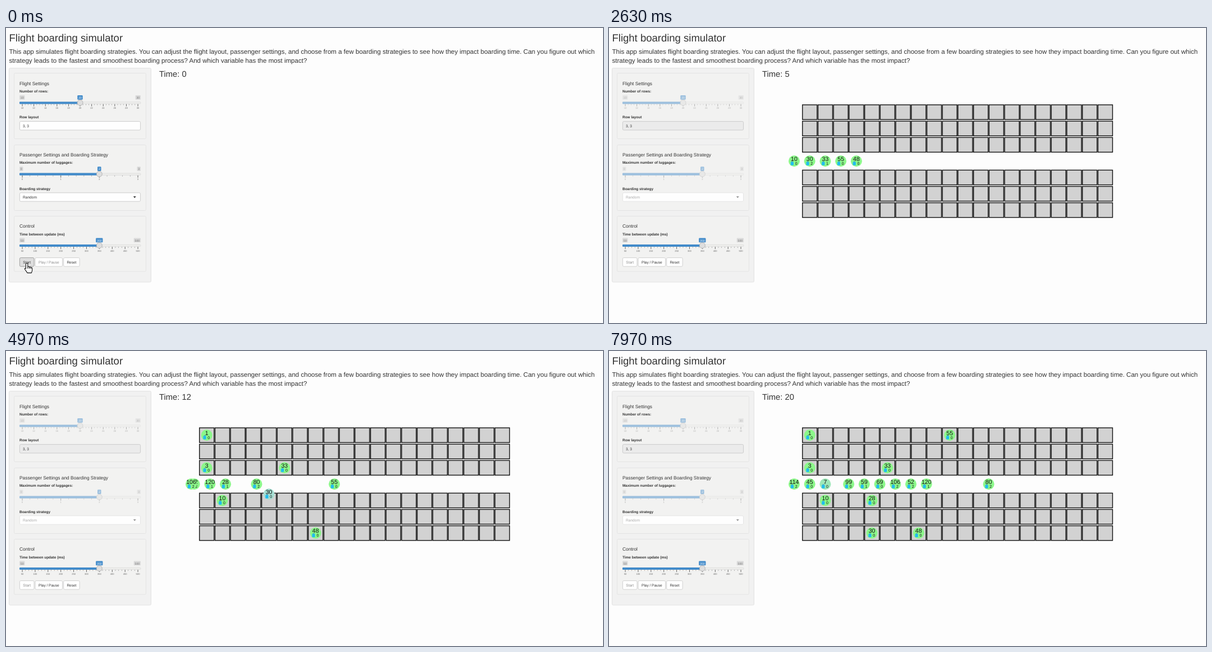
An HTML page that plays this animation: 1064x526 px, repeating every 8000 ms.

```html
<!DOCTYPE html>
<html lang="en">
<head>
<meta charset="utf-8">
<title>Flight boarding simulator</title>
<style>
html, body { margin: 0; width: 100%; height: 100%; overflow: hidden; background: #fdfdfd; }
svg { display: block; width: 1064px; height: 526px; }
text { font-family: "Liberation Sans", Arial, sans-serif; fill: #333; text-rendering: geometricPrecision; white-space: pre; }
</style>
</head>
<body>
<svg id="stage" viewBox="0 0 1064 526">
  <g id="page"></g>
  <g id="panel"></g>
  <g id="plane"></g>
  <g id="people"></g>
  <g id="cursor"></g>
</svg>
<script>
const LOOP = 8000, START = 560, MOVE = 200;
const COL = 27.72, ROW = 29.1, DOOR = 330, TOP = 150;
const $ = id => document.getElementById(id);
const lerp = (a, b, k) => a + (b - a) * k;
const clamp = k => Math.max(0, Math.min(1, k));

const text = (x, y, size, str, more = '') =>
  `<text x="${x}" y="${y}" font-size="${size}" ${more}>${str}</text>`;
const rect = (x, y, w, h, fill, stroke = 'none', r = 0, more = '') =>
  `<rect x="${x}" y="${y}" width="${w}" height="${h}" fill="${fill}" stroke="${stroke}" rx="${r}" ${more}/>`;
const MID = 'text-anchor="middle"', BOLD = 'font-weight="bold"';

// ---- boarding simulation: [seat, bags] in queue order ----
const queue = [[48, 0], [55, 0], [33, 1], [30, 2], [10, 0], [80, 2], [3, 0], [1, 0], [28, 1],
  [120, 1], [52, 2], [106, 2], [69, 0], [59, 1], [99, 0], [7, 1], [45, 0], [114, 2]];

function simulate(ticks) {
  const people = [], log = [[]];
  const free = pos => !people.some(p => !p.seated && p.pos === pos);
  let next = 0;
  for (let n = 1; n <= ticks; n++) {
    for (const p of people) {
      if (p.seated) continue;
      if (p.pos === Math.ceil(p.seat / 6)) {
        p.busy = p.bags > 0 ? 1 : 0;
        if (p.bags) p.bags--;
        else {
          p.seated = true;
          const i = (p.seat - 1) % 6;
          p.lane = i < 3 ? i : i + 1;
        }
      } else if (free(p.pos + 1)) p.pos++;
    }
    if (next < queue.length && free(0)) {
      const [seat, bags] = queue[next++];
      people.push({ seat, bags, pos: 0, lane: 3, busy: 0 });
    }
    log.push(people.map(p => ({ ...p })));
  }
  return log;
}
const log = simulate(20);

// Tick start times, evenly spaced between a few measured ones
const marks = [[1, 936], [3, 1662], [12, 4930], [16, 6427], [18, 7150], [20, 7870]];
const starts = log.map((_, n) => {
  if (!n) return 0;
  const i = Math.max(1, marks.findIndex(m => m[0] >= n));
  const [a, ta] = marks[i - 1], [b, tb] = marks[i];
  return lerp(ta, tb, (n - a) / (b - a));
});

// ---- static parts ----
function drawPage() {
  $('page').innerHTML =
    text(5.5, 24.3, 18.5, 'Flight boarding simulator') +
    text(5.5, 45.6, 11.56, 'This app simulates flight boarding strategies. You can adjust the flight layout, passenger settings, and choose from a few boarding strategies to see how they impact boarding time. Can you figure out which') +
    text(5.5, 61.8, 11.56, 'strategy leads to the fastest and smoothest boarding process? And which variable has the most impact?') +
    text(273, 86.5, 14.75, 'Time: <tspan id="clock">0</tspan>');

  let seats = '';
  for (let c = 0; c < 20; c++)
    for (const lane of [0, 1, 2, 4, 5, 6])
      seats += rect(344.8 + c * COL, TOP - 13 + lane * ROW, 26, 26.2, '#d2d2d2', '#111', 0, 'stroke-width="1.4"');
  $('plane').innerHTML = seats;
}

function slider(dy, labels, minors, value, x, off) {
  const step = 206 / (labels.length - 1);
  const tag = (str, cx, fill, ink) => {
    const w = 3.6 + str.length * 2.9;
    cx = Math.max(24 + w / 2, Math.min(240 - w / 2, cx));
    return rect(cx - w / 2, 120, w, 7.8, fill, 'none', 1.2) +
      text(cx, 126, 5.1, str, `${MID} style="fill:${ink}"`);
  };
  let out = rect(24, 131.8, 216, 3.4, '#eeeeec', '#d2d2d2', 1.5, 'stroke-width=".6"') +
    rect(24, 131.4, x - 24, 4.2, '#428bca', 'none', 1);
  labels.forEach((label, i) => {
    const tx = 29 + i * step;
    out += rect(tx - .4, 135.6, .9, 4, '#555') + text(tx, 144, 4.1, label, `${MID} style="fill:#666"`);
    if (i < labels.length - 1)
      for (let m = 1; m < minors; m++) out += rect(tx + step * m / minors - .3, 135.6, .6, 2, '#888');
  });
  out += tag(labels[0], 24, '#d9d9d9', '#777') + tag(labels.at(-1), 240, '#d9d9d9', '#777') +
    tag(value, x, '#428bca', '#fff') +
    `<circle cx="${x}" cy="133.2" r="5" fill="#dedede" stroke="#aaa" stroke-width=".8"/>`;
  return `<g transform="translate(0 ${dy})" opacity="${off ? .48 : 1}">${out}</g>`;
}

const range = (from, to, step) =>
  Array.from({ length: (to - from) / step + 1 }, (_, i) => String(from + i * step));

function button(x, w, label, off, pressed) {
  return rect(x, 409.6, w, 15.6, pressed ? '#dedede' : '#fefefe', pressed ? '#999' : '#ccc', 2, 'stroke-width=".9"') +
    text(x + w / 2, 419.5, 6.5, label, `${MID} style="fill:${off ? '#8c8c8c' : '#333'}"`);
}

function drawPanel(running) {
  const well = (y, h) => rect(14.5, y, 235, h, '#f2f2f1', '#e2e2e2', 2, 'stroke-width=".9"');
  const label = (y, str) => text(24, y, 6.45, str, BOLD);
  const head = (y, str) => text(24, y, 8.37, str);
  const field = (y, fill, stroke) => rect(24.4, y, 215.2, 15.4, fill, stroke, 2, 'stroke-width=".9"');
  const soft = running ? '#aaa' : '#333';
  $('panel').innerHTML =
    rect(5.5, 71.5, 253, 381.5, '#f1f1f1', '#e2e2e2', 2) +
    well(80.5, 117) + well(208.5, 117) + well(335.5, 98.5) +
    head(101.5, 'Flight Settings') + label(115, 'Number of rows:') +
    slider(0, range(10, 30, 2), 4, '20', 132, running) +
    label(161.3, 'Row layout') +
    field(166.6, running ? '#ebebeb' : '#fefefe', '#c8c8c8') + text(30, 176.6, 6.5, '3, 3') +
    head(228.9, 'Passenger Settings and Boarding Strategy') + label(242.4, 'Maximum number of luggages:') +
    slider(127.2, range(0, 3, 1), 5, '2', 166.3, running) +
    label(288.5, 'Boarding strategy') +
    field(293.8, '#fefefe', running ? '#e2e2e2' : '#c8c8c8') +
    text(30, 303.7, 6.6, 'Random', `style="fill:${soft}"`) +
    `<path d="M226.8 300.2h5l-2.5 2.7z" fill="${running ? '#888' : '#222'}"/>` +
    head(356.4, 'Control') + label(369.9, 'Time between update (ms)') +
    slider(254.5, range(50, 500, 50), 4, '350', 166.3, false) +
    button(24.4, 25.6, 'Start', running, !running) +
    button(52, 48.6, 'Play / Pause', !running) +
    button(102.6, 28.6, 'Reset');
}

// ---- moving parts ----
const GREEN = [140, 248, 138], BLUE = [173, 216, 230];

function person(p, from, k) {
  const x = lerp(DOOR + from.pos * COL, DOOR + p.pos * COL, k);
  const y = TOP + lerp(from.lane, p.lane, k) * ROW;
  const mix = lerp(from.busy, p.busy, k);
  const fill = GREEN.map((g, i) => Math.round(lerp(g, BLUE[i], mix)));
  return `<g transform="translate(${x} ${y})"><circle r="10" fill="rgb(${fill})"/>` +
    text(0, -.2, 10.6, p.seat, `${MID} style="fill:#111"`) +
    '<path d="M-4.6 1.6v-1h2.2v1" fill="none" stroke="#2a86b0" stroke-width=".7"/>' +
    rect(-6.2, 1.5, 5.2, 6, '#20bdf0', 'none', .8) +
    text(3.6, 6.8, 7, p.bags, `${MID} style="fill:#111"`) + '</g>';
}

const HAND = 'M4.5 1.2c1.2 0 1.8.8 1.8 1.8v5c.5-.7 2.6-.6 2.9.5.8-.7 2.5-.3 2.7.7 1-.5 2.3.1 2.3 1.4v3.200c0 2-.9 2.6-1.300 4.800H5.400c-.6-2.200-2.900-4-4.500-6.600-.8-1.400.9-2.500 2-.9V3c0-1 .6-1.800 1.600-1.800zM6.300 8v3M9.200 8.500v2.700M11.900 9.200v2.200';
const ARROW = 'M0 0v13l3-2.800 2 4.600 2.200-1-2-4.400h4.200z';

function drawCursor(t) {
  const hand = t < START;
  const down = clamp((t - START) / 300), exit = clamp((t - 1800) / 300);
  const x = hand ? 32.5 : 35.6;
  const y = hand ? 418 : lerp(419, 436, down) + 95 * exit * exit;
  $('cursor').innerHTML = `<path transform="translate(${x} ${y})" d="${hand ? HAND : ARROW}"
    fill="#fff" stroke="#111" stroke-width="1.1" stroke-linejoin="round"/>`;
}

let wasRunning;
function render(t) {
  const running = t >= START;
  if (running !== wasRunning) {
    drawPanel(running);
    $('plane').style.display = running ? '' : 'none';
    wasRunning = running;
  }
  const tick = starts.filter(s => s <= t).length - 1;
  const k = clamp((t - starts[tick]) / MOVE);
  $('clock').textContent = tick;
  $('people').innerHTML = log[tick].map((p, i) => person(p, log[tick - 1][i] || p, k)).join('');
  drawCursor(t);
}

drawPage();
const t0 = performance.now();
(function loop() {
  render((performance.now() - t0) % LOOP);
  requestAnimationFrame(loop);
})();
</script>
</body>
</html>
```
